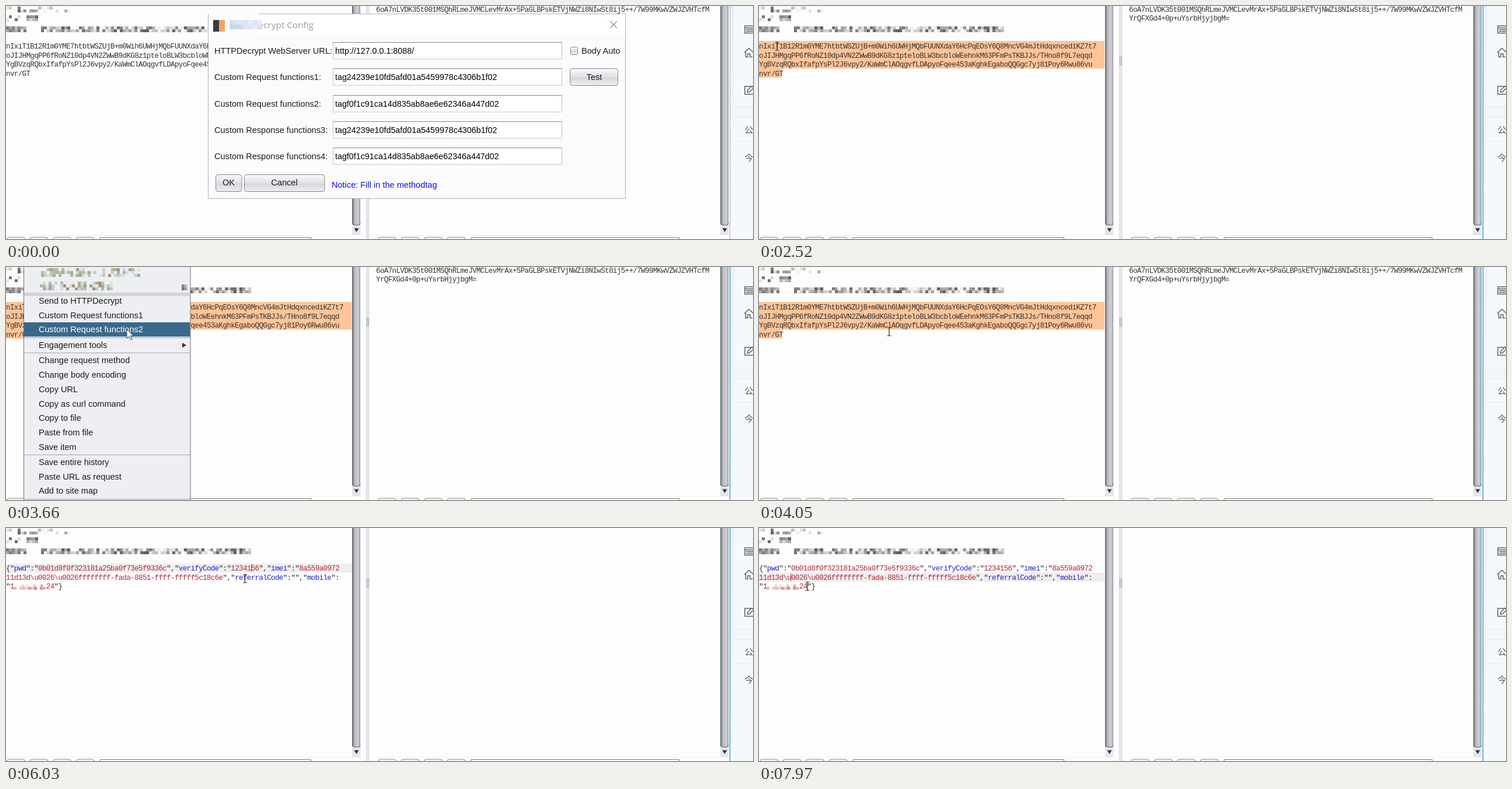
These frames come from a looping animation (1280 px wide and 400 px high, 8000 ms). An HTML page:

```html
<!DOCTYPE html>
<html lang="en">
<head>
<meta charset="utf-8">
<title>Request editor</title>
<style>
html, body { margin: 0; width: 100%; height: 100%; overflow: hidden; background: #fdfdfd; }
svg { display: block; width: 1280px; height: 400px; }
text { font: 14.57px "Liberation Sans", Arial, sans-serif; fill: #1c1c1c; white-space: pre; }
.code text { font: 12.5px "Liberation Mono", "Courier New", monospace; letter-spacing: -0.622px; fill: #333; }
.code .k { fill: #2222d0; }
.code .s { fill: #b02a3a; }
.field { font-size: 14.3px; fill: #000; }
.mid { text-anchor: middle; }
.title { font: 15.3px "Open Sans", sans-serif; fill: #999; }
.cjk { font: 15px "Noto Sans CJK SC", "Noto Sans CJK", sans-serif; fill: #555; }
.sel { fill: #ffc497; }
.line { fill: #eee; }
.caret { fill: #e8402a; }
.icon { fill: none; stroke: #5c6066; stroke-width: 1.5; }
.btn { fill: url(#btn); stroke: #83868c; }
</style>
</head>
<body>
<svg id="stage" viewBox="0 0 1280 400" xmlns="http://www.w3.org/2000/svg">
  <defs>
    <linearGradient id="btn" x2="0" y2="1">
      <stop offset="0" stop-color="#fafafb"/><stop offset=".5" stop-color="#dfe1e6"/>
      <stop offset=".55" stop-color="#d5d8de"/><stop offset="1" stop-color="#eceef2"/>
    </linearGradient>
    <linearGradient id="thumb">
      <stop offset="0" stop-color="#55575c"/><stop offset=".14" stop-color="#8d9097"/>
      <stop offset=".3" stop-color="#b6b9c0"/><stop offset=".7" stop-color="#d0d2d8"/>
      <stop offset=".9" stop-color="#b4b7be"/><stop offset="1" stop-color="#84878d"/>
    </linearGradient>
    <linearGradient id="side" x2="0" y2="1">
      <stop offset="0" stop-color="#eaf1f8"/><stop offset=".45" stop-color="#f2f6fb"/>
      <stop offset="1" stop-color="#f8fafc"/>
    </linearGradient>
    <g id="bar">
      <rect y="370" width="14.500" height="23" fill="#e4e6ea"/>
      <path d="M0 0V373Q1 376 4 376H11Q14 376 14 373V0Z" fill="url(#thumb)"/>
      <path d="M0 373Q1 376 4 376H11Q14 376 14 373" fill="none" stroke="#5a5c61"/>
      <path d="M3.500 381.500h8l-4 6.500z" fill="#333"/>
    </g>
    <g id="foot">
      <path d="M0 393.5H607" stroke="#f1f1f3"/>
      <g class="btn">
        <rect x="1.5" y="397" width="31" height="20" rx="4"/><rect x="41" y="397" width="31" height="20" rx="4"/>
        <rect x="80.5" y="397" width="31" height="20" rx="4"/><rect x="120" y="397" width="31" height="20" rx="4"/>
      </g>
    </g>
  </defs>

  <rect width="1280" height="400" fill="#fdfdfd"/>
  <rect id="row1" class="line" y="61" width="592" height="15.500"/>
  <rect id="row2" class="line" y="76.500" width="592" height="15.500"/>
  <path id="selA" class="sel" d="M0 60H592V107.500H39V123H0Z"/>
  <path id="selB" class="sel" d="M0 60H592V91.500H94V107H0Z"/>
  <rect id="selC" class="sel" x="109.500" y="61" width="6" height="15.500" style="fill:#f79a5c"/>

  <g class="code">
    <g id="cipher">
      <text y="73">nIxiT1B12R1m0YME7htbtWSZUjB+m0Wih6UWHjMQbFUUNXdaY6HcPqEOsY6Q8MncVG4mJtHdqxncediKZ7t7</text>
      <text y="89">oJIJHMgqPP6fRoNZ10dp4VN2ZWwB9dKG8z1pteloBLW3bcbloWEehnkM63PFmPsTKBJJs/THno8f9L7eqqd</text>
      <text y="104">YgBVzqRQbxIfafpYsPl2J6vpy2/KaWmClAOqgvfLDApyoFqee453aKghkEgaboQQGgc7yj81Poy6Rwu86vu</text>
      <text y="120">nvr/GT</text>
      <text x="634" y="10">6oA7nLVDK35t001MSQhRLmeJVMCLevMrAx+5PaGLBPskETVjNWZi8NIwSt8ij5++/7W99MKwVZWJZVHTcfM</text>
      <text x="634" y="25">YrQFXGd4+0p+uYsrbHjyjbgM=</text>
    </g>
    <g id="plainA"></g>
    <g id="plainB"></g>
  </g>
  <g id="phone"></g>
  <g id="header"></g>
  <g id="carets"></g>

  <use href="#bar" x="593"/>
  <use href="#bar" x="1224"/>
  <rect x="618" width="4" height="400" fill="#e5e6ee"/>
  <path d="M617.500 0V400M622 0V400" stroke="#dcdde4"/>
  <rect x="618" y="87" width="3.500" height="15" rx="1" fill="#cfd1d9" stroke="#9a9ca6" stroke-width=".7"/>
  <use href="#foot"/>
  <use href="#foot" x="636"/>
  <path d="M161 400V397.500H522.500V400M797 400V397.500H1153.500V400" fill="#fff" stroke="#77797d"/>

  <rect x="1241" width="39" height="400" fill="url(#side)"/>
  <path d="M1248 0H1280V173H1248ZM1248 192H1280V232H1248ZM1248 233H1280V400H1248Z" fill="#f6f9fc"/>
  <path d="M1248 173.500H1280M1248 191.500H1280M1248 232.500H1280" stroke="#e4e9f0"/>
  <path d="M1240.500 0V400" stroke="#a9adb3"/>
  <path id="edge" d="M1240.500 0V400" stroke="#3f9fd0" stroke-width="1.500"/>
  <g class="icon">
    <path d="M1266 34H1282V46.500H1266ZM1266 37.500H1282M1268 40.500H1280M1268 43.500H1280"/>
    <path d="M1265 80L1273 72.500L1281 80M1267.500 79V87.500H1271V82H1275V87.500H1279"/>
    <path d="M1282 138H1266V151.500H1282M1270.500 148L1271 144.500L1278 137.500L1281 140.500L1274 147.500Z"/>
  </g>
  <text class="cjk" x="1265.500" y="218">公</text>
  <text class="cjk" x="1265.500" y="266">今</text>

  <g id="menu">
    <rect x="30.500" y="-5" width="285.500" height="415" fill="#edeff2" stroke="#6c6f75"/>
    <rect x="31" y="44" width="284.500" height="6" fill="#d2d4d9"/>
    <path d="M31 121.500H315M31 147.500H315M31 322.500H315M31 398.500H315" stroke="#a3a6ad"/>
    <path d="M302 130v8.500l7-4.250z" fill="#333"/>
  </g>

  <g id="dialog">
    <rect x="346.500" y="13.500" width="715" height="317" fill="#fbfbfb" stroke="#b0b0b0"/>
    <rect x="347" y="12" width="86" height="34" fill="#fcfcfc"/>
    <rect x="433" y="14" width="628" height="34" fill="#fff"/>
    <text class="title" x="527" y="38" text-anchor="end">Decrypt Config</text>
    <g id="badge"></g>
    <path d="M1035 26L1047 38M1047 26L1035 38" stroke="#8c8c8c" stroke-width="1.100"/>
    <rect x="967.500" y="70.500" width="12" height="13" rx="2" class="btn"/>
    <text x="986" y="82">Body Auto</text>
    <rect class="btn" x="966.500" y="107.500" width="82" height="29" rx="4"/>
    <text class="mid" x="1008" y="127">Test</text>
    <rect class="btn" x="359.500" y="289.500" width="44.500" height="29" rx="4"/>
    <rect id="hover" x="359.500" y="289.500" width="44.500" height="29" rx="4" fill="#fff" fill-opacity=".5" stroke="#6f747c"/>
    <text class="mid" x="381.500" y="308">OK</text>
    <rect class="btn" x="408.500" y="289.500" width="137.500" height="29" rx="4"/>
    <text class="mid" x="477" y="308">Cancel</text>
    <text x="558" y="312" style="fill:#1010f0">Notice: Fill in the methodtag</text>
  </g>

  <g id="pointer">
    <circle id="press" r="12.500" fill="#f4ee20" fill-opacity=".68"/>
    <path id="arrow" d="M0 0V16L4 12.500L6.500 18.500L9 17.500L6.500 11.500H11.500Z" fill="#fff" stroke="#333" stroke-width=".9"/>
    <path id="beam" d="M-3.500 -7H-1Q0 -7 0 -6Q0 -7 1 -7H3.500M0 -6V6M-3.500 7H-1Q0 7 0 6Q0 7 1 7H3.500" fill="none" stroke="#222" stroke-width="1.200"/>
  </g>
</svg>
<script>
const LOOP = 8000;
const $ = id => document.getElementById(id);
const rules = [];
let seed = 11;
const rand = () => (seed = (seed * 16807) % 2147483647) / 2147483647;
const pct = ms => (ms * 100 / LOOP).toFixed(3) + '%';

function add(parent, tag, attrs, content = '') {
  const el = document.createElementNS('http://www.w3.org/2000/svg', tag);
  for (const key in attrs) el.setAttribute(key, attrs[key]);
  el.textContent = content;
  return $(parent).appendChild(el);
}

// Visible only inside the given [from, to] spans, in ms
function show(id, ...spans) {
  const steps = spans.map(([a, b]) => `${pct(a)}{opacity:1}${pct(b)}{opacity:0}`).join('');
  rules.push(`@keyframes ${id}{0%{opacity:0}${steps}}#${id}{animation:${id} ${LOOP}ms step-end infinite}`);
}

function travel(id, stops) {
  const steps = stops.map(([t, x, y]) => `${pct(t)}{transform:translate(${x}px,${y}px)}`).join('');
  rules.push(`@keyframes ${id}{${steps}}#${id}{animation:${id} ${LOOP}ms ease-in-out infinite}`);
}

function mosaic(parent, x, y, w, h, fill, size = 5, density = 1) {
  for (let cy = y; cy < y + h; cy += size)
    for (let cx = x; cx < x + w; cx += size)
      if (rand() < density) add(parent, 'rect', { x: cx, y: cy, width: size, height: size, fill: fill(rand()) });
}
const gray = v => { const n = 95 + v * 150 | 0; return `rgb(${n},${n},${n})`; };
const rosy = v => `rgba(185,60,50,${(v * .7).toFixed(2)})`;
const tint = v => `hsl(${20 + v * 190},14%,${55 + v * 37}%)`;

// Marks: <key>, [string]
function code(parent, lines) {
  lines.forEach((line, i) => {
    const text = add(parent, 'text', { y: [73, 89, 104][i] });
    for (const [, key, str, rest] of line.matchAll(/<(.*?)>|\[(.*?)\]|([^<\[]+)/g)) {
      const span = document.createElementNS(text.namespaceURI, 'tspan');
      span.textContent = key || str || rest;
      if (!rest) span.setAttribute('class', key ? 'k' : 's');
      text.append(span);
    }
  });
}
const hash = '{"<pwd>":"[0b01d8f0f323181a25ba0f73e5f9336c]","<verifyCode>":"';
const tail = '1d13d\\u0026\\u0026ffffffff-fada-8851-ffff-fffff5c18c6e]","<referralCode>":"","<mobile>":';
const gap = '\u00a0'.repeat(8);
code('plainA', [hash + '[123456]","<imei>":"[8a559a09721]', '[' + tail + '"', `[13${gap}4]"}`]);
code('plainB', [hash + '[1234156]","<imei>":"[8a559a0972]', '[1' + tail, `"[1${gap}24]"}`]);
mosaic('phone', 13, 101, 54, 5, rosy, 5);
mosaic('phone', 23, 97, 44, 4, rosy, 4, .3);

mosaic('header', 0, 1, 115, 10, gray, 5, .4);
mosaic('header', 0, 16, 25, 10, gray, 5, .4);
mosaic('header', 35, 16, 20, 10, gray);
mosaic('header', 0, 35, 35, 10, gray, 5, .9);
mosaic('header', 50, 35, 370, 10, gray, 5, .82);

mosaic('menu', 60, 2, 168, 15, tint, 5, .65);
mosaic('menu', 58, 25, 125, 15, tint, 5, .65);
mosaic('menu', 301, 30, 10, 10, gray);

mosaic('badge', 355, 24, 10, 18, () => '#3a3a3c', 10);
mosaic('badge', 365, 24, 10, 18, v => `hsl(28,80%,${58 + v * 12}%)`, 10);
mosaic('badge', 383, 24, 50, 14, v => `hsl(${205 + v * 20},45%,${84 + v * 12}%)`, 8);

const items = [['Send to HTTPDecrypt', 58], ['Custom Request functions1', 82.500], ['Custom Request functions2', 107],
  ['Engagement tools', 134], ['Change request method', 160], ['Change body encoding', 185], ['Copy URL', 210],
  ['Copy as curl command', 234.500], ['Copy to file', 259], ['Paste from file', 284], ['Save item', 308.500],
  ['Save entire history', 335], ['Paste URL as request', 359.500], ['Add to site map', 384]];
items.forEach(([label, y]) => add('menu', 'text', { x: 56, y: y + 5 }, label));
[[3420, 3500], [3500, 3620], [3620, 3900]].forEach((span, i) => {
  const [label, y] = items[i], id = 'item' + i;
  add('menu', 'g', { id });
  add(id, 'rect', { x: 31, y: y - 12, width: 284.500, height: 24.500, fill: '#39698a' });
  add(id, 'text', { x: 56, y: y + 5, style: 'fill:#fff' }, label);
  show(id, span);
});

[['HTTPDecrypt WebServer URL:', 'http://127.0.0.1:8088/'],
 ['Custom Request functions1:', 'tag24239e10fd5afd01a5459978c4306b1f02'],
 ['Custom Request functions2:', 'tagf0f1c91ca14d835ab8ae6e62346a447d02'],
 ['Custom Response functions3:', 'tag24239e10fd5afd01a5459978c4306b1f02'],
 ['Custom Response functions4:', 'tagf0f1c91ca14d835ab8ae6e62346a447d02']].forEach(([label, value], i) => {
  const y = 62.500 + Math.round(i * 45.300);
  add('dialog', 'text', { x: 357, y: y + 19.500 }, label);
  add('dialog', 'rect', { x: 560.500, y, width: 392, height: 28.500, fill: '#fff', stroke: '#c3c5c9' });
  add('dialog', 'path', { d: `M560 ${y}H953`, stroke: '#85878b' });
  add('dialog', 'text', { x: 564, y: y + 19.500, class: 'field' }, value);
});

[[806, 14, 1600, 2210], [34, 62, 2290, 2440], [413, 62, 5500, 5800], [420, 62, 5800, 6500],
 [41, 62, 7050, 7890], [54, 78, 7890, LOOP]].forEach(([x, y, from, to], i) => {
  add('carets', 'rect', { id: 'caret' + i, class: 'caret', x, y, width: 1.200, height: 13.500 });
  show('caret' + i, [from, to]);
});

show('dialog', [0, 1290]);
show('hover', [590, 1290]);
show('edge', [1290, LOOP]);
show('cipher', [0, 4260]);
show('plainA', [4260, 5800]);
show('plainB', [5800, LOOP]);
show('phone', [4260, LOOP]);
show('row1', [2290, 2440], [4260, 6500], [7050, 7890]);
show('row2', [7890, LOOP]);
show('selA', [2440, 4260]);
show('selB', [6500, 7050]);
show('selC', [4900, 5030]);
show('menu', [2980, 3900]);
show('arrow', [120, 1290], [2980, 3900]);
show('beam', [1290, 2980], [3900, LOOP]);
show('press', [1210, 1290], [2210, 2290], [2750, 2830], [3820, 3900], [5500, 5580], [6600, 6740], [7810, 7890]);
travel('pointer', [[0, 825, 326], [120, 825, 326], [590, 380, 300], [1440, 380, 300], [2060, 31, 69],
  [3350, 31, 69], [3740, 223, 110], [4110, 223, 111], [4570, 180, 102], [4900, 113, 69], [5030, 113, 69],
  [5420, 413, 69], [5900, 413, 69], [6260, 400, 133], [6340, 385, 133], [6600, 42, 75], [7050, 42, 75],
  [7400, 60, 92], [7810, 54, 85], [7890, 54, 85], [7970, 83, 100], [LOOP, 83, 100]]);

const style = document.createElement('style');
style.textContent = rules.join('\n');
document.head.append(style);
</script>
</body>
</html>
```
